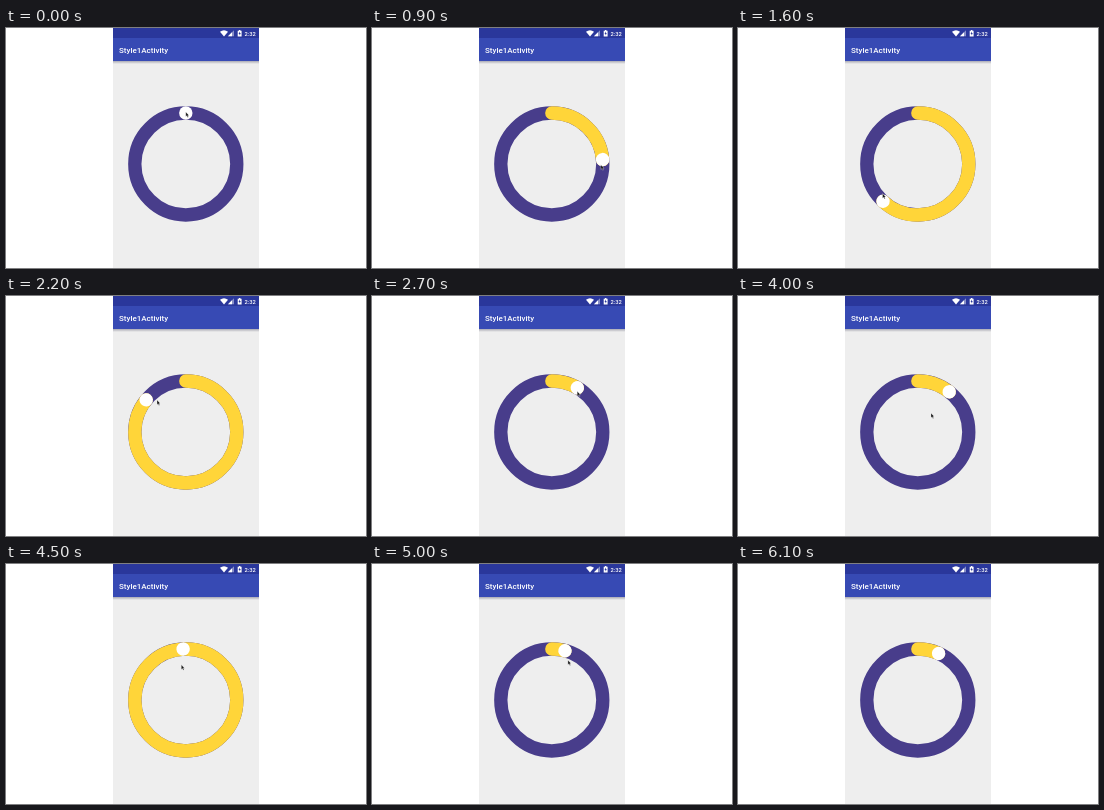
An HTML page that plays this animation: 360x240 px, repeating every 6.3 s.

```html
<!DOCTYPE html>
<html lang="en">
<head>
<meta charset="utf-8">
<title>Circular seek bar</title>
<style>
html, body { margin: 0; width: 100%; height: 100%; overflow: hidden; background: #fff; }
svg { display: block; width: 360px; height: 240px; }
text { font-family: Roboto, sans-serif; font-weight: 500; fill: #fff; }
</style>
</head>
<body>
<svg viewBox="0 0 360 240">
  <defs>
    <linearGradient id="shade" x2="0" y2="1">
      <stop stop-color="#aaaab4"/>
      <stop offset="1" stop-color="#eee"/>
    </linearGradient>
  </defs>
  <rect x="107" width="146" height="240" fill="#eee"/>
  <rect x="107" y="33" width="146" height="3" fill="url(#shade)"/>
  <rect x="107" y="10" width="146" height="23" fill="#374ab4"/>
  <rect x="107" width="146" height="10" fill="#2a379b"/>
  <text x="113" y="24.6" font-size="8">Style1Activity</text>
  <text x="238.4" y="7.6" font-size="5.8">2:32</text>
  <g fill="#fff">
    <path d="M214 3.8Q218 .8 222 3.8L218 8.4Z"/>
    <path d="M228 2.2V8.2H222Z" fill-opacity=".45"/>
    <path d="M226 4.2V8.2H222Z"/>
    <path d="M232.9 2H234.4V2.7H235.6V8.4H231.7V2.7H232.9Z"/>
  </g>
  <path d="M234 3.5L232.5 5.9H233.5V7.6L234.9 5.2H234Z" fill="#2a379b"/>
  <g transform="translate(179.8 136)">
    <g fill="none" stroke-width="13.3">
      <circle r="51" stroke="#483d8b"/>
      <circle id="progress" r="51" stroke="#ffd539" stroke-linecap="round" pathLength="360" transform="rotate(-90)"/>
    </g>
    <circle id="knob" cy="-51" r="6.7" fill="#fff"/>
    <path id="cursor" d="M0 0V4.6L1.1 3.7L1.9 5.4L2.7 5L1.9 3.4H3.2Z" fill="#111" stroke="#fff" stroke-width=".3"/>
  </g>
</svg>
<script>
const [progress, knob, cursor] = ['progress', 'knob', 'cursor'].map(id => document.getElementById(id));
const LOOP = 6300, STEP = 100;

// time, knob angle, pointer angle, pointer radius
const keys = [
  [0, 0, 0, 52], [200, 2, 5, 52], [700, 58, 64, 50], [1100, 112, 118, 48],
  [1400, 163, 171, 46], [1600, 223, 230, 46], [1800, 263, 270, 45],
  [2200, 309, 318, 43], [2500, 360, 368, 45], [2700, 390, 392, 48],
  [2850, 385, 380, 52], [3200, 342, 337, 56], [3400, 332, 332, 48],
  [3700, 366, 372, 34], [4000, 398, 395, 23], [4200, 390, 385, 28],
  [4600, 346, 342, 38], [4800, 343, 348, 42], [5000, 375, 382, 43],
  [5300, 384, 385, 42], [6300, 384, 385, 42]
];

function poseAt(t) {
  const i = keys.findIndex(k => k[0] > t), a = keys[i - 1], b = keys[i];
  const u = (t - a[0]) / (b[0] - a[0]);
  return a.map((v, j) => v + (b[j] - v) * u);
}

function draw(now) {
  const t = Math.floor(now % LOOP / STEP) * STEP;
  const [, turn, aim, radius] = poseAt(t);
  const angle = turn % 360, rad = aim * Math.PI / 180;
  progress.setAttribute('stroke-dasharray', `${angle} 720`);
  progress.style.display = angle ? '' : 'none';
  knob.setAttribute('transform', `rotate(${angle})`);
  cursor.setAttribute('transform', `translate(${radius * Math.sin(rad)} ${-radius * Math.cos(rad)})`);
  cursor.style.display = t < 5700 ? '' : 'none';
}

const start = performance.now();
function tick() {
  draw(performance.now() - start);
  requestAnimationFrame(tick);
}
tick();
</script>
</body>
</html>
```
